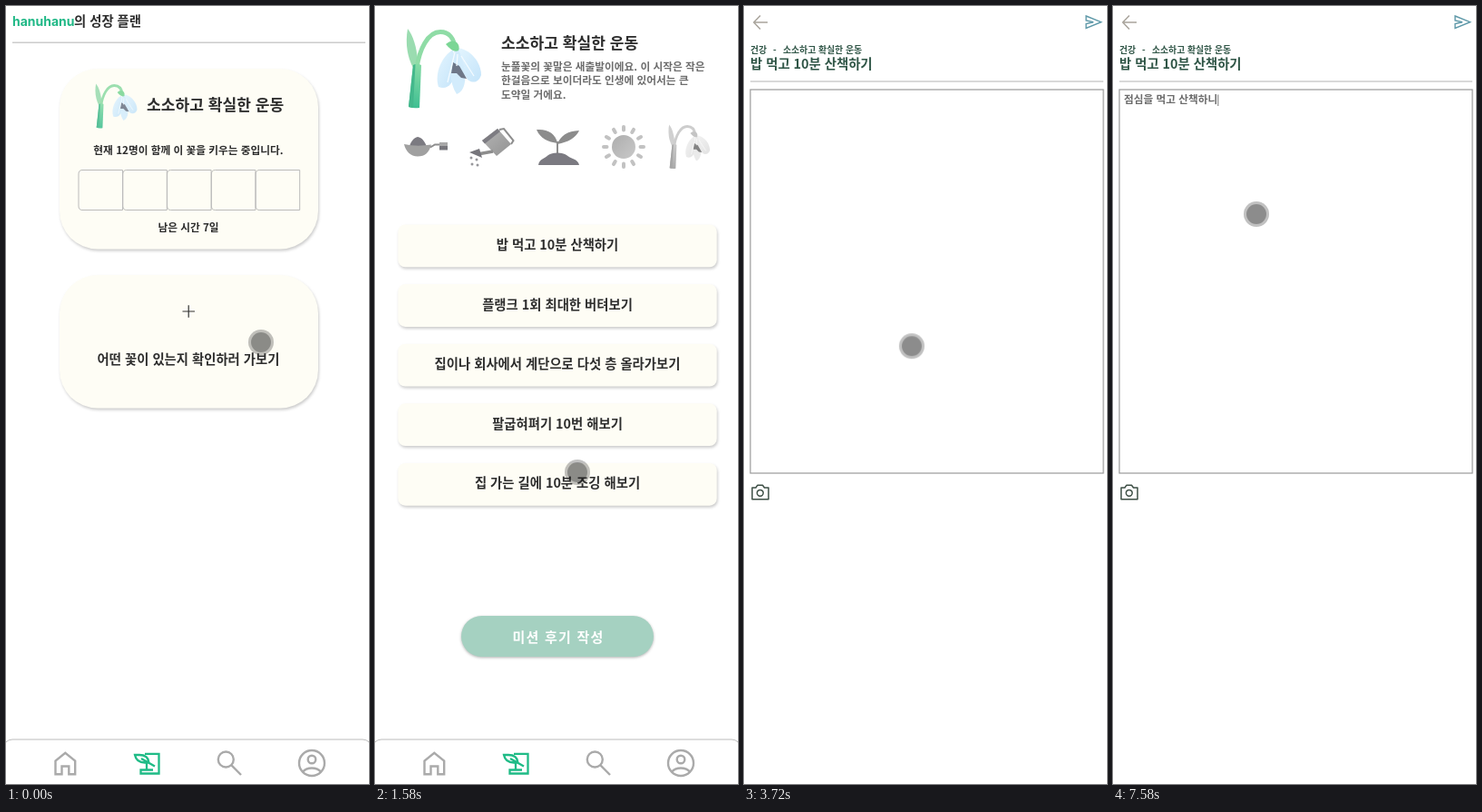
An HTML page that plays this animation: 400 px wide and 856 px high, repeating every 8 s.

```html
<!DOCTYPE html>
<html lang="ko">
<head>
<meta charset="utf-8">
<title>성장 플랜</title>
<style>
html, body { margin: 0; width: 100%; height: 100%; overflow: hidden; background: #fff; }
svg { display: block; width: 100vw; height: 100vh; }
text { font-family: "Noto Sans CJK KR", "Noto Sans KR", "Noto Sans CJK", sans-serif; font-weight: 600; fill: #2d2d2d; white-space: pre; }
.mid { text-anchor: middle; }
.s10 { font-size: 9.85px; }
.s12 { font-size: 11.7px; }
.s14 { font-size: 14.35px; }
.s17 { font-size: 17.1px; }
.soft { fill: #6c6c6c; }
.pine { fill: #2f5546; }
.name { font: 700 14px Inter, sans-serif; fill: #1fb886; }
.card { fill: #fefdf5; filter: drop-shadow(1px 2px 1.5px rgba(0,0,0,.2)); }
.line { fill: none; stroke: #aaa; stroke-width: 2.4; }
.rule { stroke: #ccc; stroke-width: 1.5; }
.gray { filter: grayscale(1); opacity: .9; }

/* one loop is 8 s, so 1% is 80 ms */
.page, .pick, .btn, .btnText, .mark, #cursor { animation: 8s linear infinite; }
.page { animation-timing-function: step-end; }
#plan { animation-name: plan; }
#task { animation-name: task; }
#note { animation-name: note; }
#nav { animation-name: nav; }
@keyframes plan { 0% { opacity: 1 } 11%, 100% { opacity: 0 } }
@keyframes task { 0% { opacity: 0 } 11% { opacity: 1 } 40.75%, 100% { opacity: 0 } }
@keyframes note { 0% { opacity: 0 } 40.75%, 100% { opacity: 1 } }
@keyframes nav { 0% { opacity: 1 } 40.75%, 100% { opacity: 0 } }

rect.pick { animation-name: pickFill; }
text.pick { animation-name: pickText; }
@keyframes pickFill { 0%, 26% { fill: #fefdf5 } 28%, 100% { fill: #305d3d } }
@keyframes pickText { 0%, 26% { fill: #2d2d2d } 28%, 100% { fill: #fff } }

.btn { animation-name: btn; filter: drop-shadow(0 1.5px 1.5px rgba(0,0,0,.3)); }
.btnText { animation-name: btnText; font-size: 15px; letter-spacing: 1.2px; }
.mark { animation-name: mark; fill: #b2dcf3; }
@keyframes btn { 0%, 26% { fill: #a5d1c1 } 28%, 39.8% { fill: #07c685 } 39.88%, 100% { fill: #18bdac } }
@keyframes btnText { 0%, 39.8% { fill: #fff } 39.88%, 100% { fill: #b9e6ee } }
@keyframes mark { 0%, 39.8% { opacity: 0 } 39.88%, 100% { opacity: 1 } }

#cursor { animation-name: roam; }
@keyframes roam {
  0%, .6% { transform: translate(281px, 370px) }
  5% { transform: translate(214px, 153px) }
  5.88%, 14.75% { transform: translate(213px, 162px) }
  17.5% { transform: translate(236px, 690px) }
  18.1% { transform: translate(237px, 700px) }
  19.75%, 20.1% { transform: translate(223px, 513px) }
  22.5% { transform: translate(202px, 310px) }
  24.5%, 30.1% { transform: translate(199px, 270px) }
  31% { transform: translate(202px, 300px) }
  33.5% { transform: translate(277px, 580px) }
  34.75%, 35.5% { transform: translate(255px, 682px) }
  36.75%, 43.9% { transform: translate(243px, 702px) }
  46.5% { transform: translate(185px, 375px) }
  48.75%, 100% { transform: translate(158px, 229px) }
}
#press { animation: press 8s step-end infinite; }
@keyframes press { 0% { opacity: 0 } 10% { opacity: 1 } 11%, 100% { opacity: 0 } }
</style>
</head>
<body>
<svg viewBox="0 0 400 856">
  <defs>
    <linearGradient id="stem" x2="0" y2="1"><stop stop-color="#85dba5"/><stop offset="1" stop-color="#3fbf92"/></linearGradient>
    <linearGradient id="petal" x2="1" y2="1"><stop stop-color="#e4f5fe"/><stop offset="1" stop-color="#c4e4fa"/></linearGradient>
    <linearGradient id="disk" x2="1" y2="1"><stop stop-color="#adadad"/><stop offset="1" stop-color="#c9c9c9"/></linearGradient>
    <linearGradient id="can" x2="1" y2="1"><stop stop-color="#b5b5b5"/><stop offset="1" stop-color="#929292"/></linearGradient>
    <radialGradient id="dark"><stop stop-opacity=".4"/><stop offset="1" stop-opacity=".08"/></radialGradient>
    <g id="flower">
      <path d="M36 25C33 42 36 57 42 68L47 60C46 46 42 32 36 25Z" fill="#9adcb0"/>
      <path d="M46 68C49 48 58 28.500 72 28.500C82 28.500 87 36 88 46" fill="none" stroke="#8fdca6" stroke-width="5"/>
      <path d="M37 111L42 65Q46 62 51 65L49 112Q42 113 37 111Z" fill="url(#stem)"/>
      <path d="M37 111L42 65L44.500 64L42 112Z" fill="#43b88c"/>
      <path d="M90 46C105 47 117 62 117 76C114 85 107 85 102 81C96 72 91 60 90 46Z" fill="url(#petal)"/>
      <path d="M86 48C74 55 65 74 70 89C79 93 87 86 89 70Z" fill="url(#petal)"/>
      <path d="M88 48C81 65 82 85 90 97C101 93 103 74 92 48Z" fill="#d3ecfc"/>
      <path d="M86 62L84 74L90 74L95 79L101 80L93 66Z" fill="#6e7788"/>
      <path d="M88 51L80 84M91 53L90 66M95 55L109 77" fill="none" stroke="#f4fbff" stroke-width="1.3"/>
      <path d="M78 42Q84 36 90 40Q94 44 92 49Q86 52 78 42Z" fill="#7bd695"/>
    </g>
  </defs>

  <g id="plan" class="page">
    <text class="name" x="7" y="22">hanuhanu</text>
    <text class="s14" x="75" y="22">의 성장 플랜</text>
    <path class="rule" d="M7 40.3H396"/>
    <rect class="card" x="59" y="69" width="285" height="198.500" rx="42"/>
    <use href="#flower" transform="translate(98 85) scale(.56) translate(-34 -24)" opacity=".88"/>
    <text class="s17" x="155" y="115">소소하고 확실한 운동</text>
    <text class="s12 mid" x="201" y="163">현재 12명이 함께 이 꽃을 키우는 중입니다.</text>
    <g id="slots" fill="none" stroke="#bbb"></g>
    <text class="s12 mid" x="201" y="248">남은 시간 7일</text>
    <rect class="card" x="59" y="296" width="285" height="146.500" rx="42"/>
    <path d="M194.500 336H208M201.200 329.200V342.800" stroke="#333" stroke-width="1.2"/>
    <text class="s14 mid" x="201" y="394">어떤 꽃이 있는지 확인하러 가보기</text>
  </g>

  <g id="task" class="page">
    <use href="#flower"/>
    <text class="s17" x="139" y="47">소소하고 확실한 운동</text>
    <text class="s12 soft" x="139" y="70.500">눈풀꽃의 꽃말은 새출발이에요. 이 시작은 작은</text>
    <text class="s12 soft" x="139" y="86">한걸음으로 보이더라도 인생에 있어서는 큰</text>
    <text class="s12 soft" x="139" y="101.800">도약일 거에요.</text>

    <g>
      <path d="M38 155C39 149 43 145 47 144C52 145 55 149 57 155Z" fill="#7b7a81"/>
      <path d="M32 152Q46 155 62 152.500C60 161 55 165.500 47 165.500C39 165.500 34 160 32 152Z" fill="#a0a0a0"/>
      <path d="M61 155.500L66 152.500H72" fill="none" stroke="#8d8d8d" stroke-width="2"/>
      <path d="M71 150H80V154H71Z" fill="#a8a8a8"/><path d="M71 154H80V158.500H71Z" fill="#77767c"/>
    </g>
    <g>
      <path d="M118 148L135 135L150 152L134 165Z" fill="url(#can)"/>
      <path d="M118 148L135 135L138 138L121 151.500Z" fill="#7d7c82"/>
      <path d="M137 136L142 135L152.500 148L150 152" fill="none" stroke="#8d8d8d" stroke-width="2"/>
      <path d="M130 160L113 163" stroke="#8d8d8d" stroke-width="3.500"/>
      <path d="M104 161L115 157L118 167Z" fill="#77767c"/>
      <g fill="#97979b"><circle cx="106" cy="167" r="1.500"/><circle cx="112" cy="169" r="1.500"/><circle cx="107" cy="174" r="1.500"/><circle cx="113" cy="175" r="1.500"/></g>
    </g>
    <g fill="#8c8c8c">
      <path d="M201 164V149" stroke="#8c8c8c" stroke-width="2"/>
      <path d="M201 151C191 149.500 182 146 178 136C190 135 199 140 201 151Z"/>
      <path d="M201 152C204 143 212 137.500 225 137C221 145.500 213 149.500 201 152Z"/>
      <path d="M180 175C181 168 187 168 191 164C195 160.500 207 160.500 211 164C215 168 224 168 225 175Z" fill="#7b7a81"/>
    </g>
    <g id="sun" stroke="#c2c2c2" stroke-width="4" stroke-linecap="round">
      <circle cx="274" cy="155" r="13" fill="url(#disk)" stroke="none"/>
    </g>
    <use class="gray" href="#flower" transform="translate(323 130) scale(.555) translate(-34 -24)"/>

    <g id="items"></g>
    <rect class="mark" x="95" y="671" width="212" height="45"/>
    <rect class="btn" x="95" y="671" width="212" height="45" rx="22.500"/>
    <text class="btnText mid" x="202" y="699.500">미션 후기 작성</text>
  </g>

  <g id="nav" class="page">
    <rect x="-3" y="807" width="406" height="60" rx="10" fill="#fff" stroke="#bbb"/>
    <path class="line" d="M54.500 845.300V830.500L65.300 821.800L76.200 830.500V845.300H69.300V836.500H61.500V845.300Z"/>
    <g fill="none" stroke="#1fbb86" stroke-width="2.300">
      <path d="M153 822.800H168.500V844.500H148.500V840.500H162"/>
      <path d="M142 824H147C153 824 157 827 157.500 832.500H153C146 832.500 143 829 142 824ZM149 828L164 836.500M155 833V840"/>
    </g>
    <circle class="line" cx="242.300" cy="829" r="8.500"/><path class="line" d="M248.500 835.300L259 846"/>
    <circle class="line" cx="337" cy="833" r="14"/><circle class="line" cx="337" cy="829" r="4.300"/>
    <path class="line" d="M327 842.800C331 837 343 837 347 842.800"/>
  </g>

  <g id="note" class="page">
    <path d="M26 18H11M18 10.500L10.800 18L18 25.500" fill="none" stroke="#a9a49c" stroke-width="1.500"/>
    <path d="M377 11L393.500 17.700L377 24.500V19.500L385 17.700L377 16Z" fill="none" stroke="#5d98a8" stroke-width="1.400"/>
    <text class="s10 pine" x="7" y="52">건강</text>
    <text class="s10 pine" x="32" y="52">-</text>
    <text class="s10 pine" x="43" y="52">소소하고 확실한 운동</text>
    <text class="s14 pine" x="7" y="69">밥 먹고 10분 산책하기</text>
    <path class="rule" d="M7 83H396"/>
    <rect x="7" y="92" width="389" height="422" fill="none" stroke="#999" stroke-width="1.200"/>
    <text class="s12 soft" x="12" y="107"><tspan id="done"></tspan><tspan id="live"></tspan></text>
    <rect id="under" y="109.500" height="1" fill="#777"/>
    <rect id="caret" y="97.500" width="1" height="12.500" fill="#777"/>
    <g fill="none" stroke="#3d4f45" stroke-width="1.500">
      <path d="M9 530H13L14.800 527.300H20.500L22.500 530H27V542.700H9Z" stroke-linejoin="round"/>
      <circle cx="17.800" cy="535.800" r="3.400"/>
    </g>
  </g>

  <g id="cursor">
    <circle r="14" fill="#323232" fill-opacity=".3"/>
    <circle r="11" fill-opacity=".27"/>
    <circle id="press" r="14" fill="url(#dark)"/>
  </g>
</svg>
<script>
const $ = id => document.getElementById(id);

for (let i = 0; i < 5; i++) {
  const x = 80 + i * 48.8;
  $('slots').innerHTML += `<path d="M${x + 48.5} 180.500H${x + 4}Q${x} 180.500 ${x} 185V220Q${x} 224.500 ${x + 4} 224.500H${x + 48.5}Z"/>`;
}

for (let i = 0; i < 12; i++) {
  $('sun').innerHTML += `<path d="M274 136.500V133" transform="rotate(${i * 30} 274 155)"/>`;
}

['밥 먹고 10분 산책하기', '플랭크 1회 최대한 버텨보기', '집이나 회사에서 계단으로 다섯 층 올라가보기',
 '팔굽혀펴기 10번 해보기', '집 가는 길에 10분 조깅 해보기'].forEach((label, i) => {
  const y = 240.5 + i * 65.6, pick = i ? '' : 'pick';
  $('items').innerHTML += `<rect class="card ${pick}" x="25.300" y="${y}" width="351.400" height="46.800" rx="8"/>
    <text class="s14 mid ${pick}" x="201" y="${y + 27.5}">${label}</text>`;
});

// time, settled text, syllable being composed
const keys = [
  [3900, '', ''], [4390, '', 'ㅈ'], [4510, '', '저'], [4640, '', '점'],
  [4780, '점', 'ㅅ'], [4940, '점', '시'], [4980, '점', '심'],
  [5200, '점심', 'ㅇ'], [5270, '점심', '으'], [5340, '점심', '을'], [5400, '점심을 ', ''], [5480, '점심을 ', 'ㅁ'],
  [5650, '점심을 ', '머'], [5740, '점심을 ', '먹'], [5830, '점심을 먹', 'ㄱ'], [5910, '점심을 먹', '고'],
  [6000, '점심을 먹고 ', ''], [6090, '점심을 먹고 ', 'ㅅ'], [6180, '점심을 먹고 ', '사'], [6270, '점심을 먹고 ', '산'],
  [6350, '점심을 먹고 산', 'ㅊ'], [6440, '점심을 먹고 산', '채'], [6790, '점심을 먹고 산', '책'],
  [6990, '점심을 먹고 산책', 'ㅎ'], [7070, '점심을 먹고 산책', '하'], [7230, '점심을 먹고 산책', '한'],
  [7400, '점심을 먹고 산책하', '니'], [7580, '점심을 먹고 산책하니', '']
];
let shown;

function type(now) {
  const t = now % 8000;
  const key = keys.filter(k => k[0] <= t).pop();
  if (key !== shown || !now) {
    shown = key;
    const [, done, live] = key || [0, '', ''];
    $('done').textContent = done;
    $('live').textContent = live;
    const a = done ? $('done').getComputedTextLength() : 0;
    const b = live ? $('live').getComputedTextLength() : 0;
    $('under').setAttribute('x', 12 + a);
    $('under').setAttribute('width', b);
    $('caret').setAttribute('x', 12 + a + b);
    $('caret').setAttribute('opacity', key ? 1 : 0);
  }
}

const start = performance.now();
function tick() {
  type(performance.now() - start);
  requestAnimationFrame(tick);
}
type(0);
tick();
</script>
</body>
</html>
```
